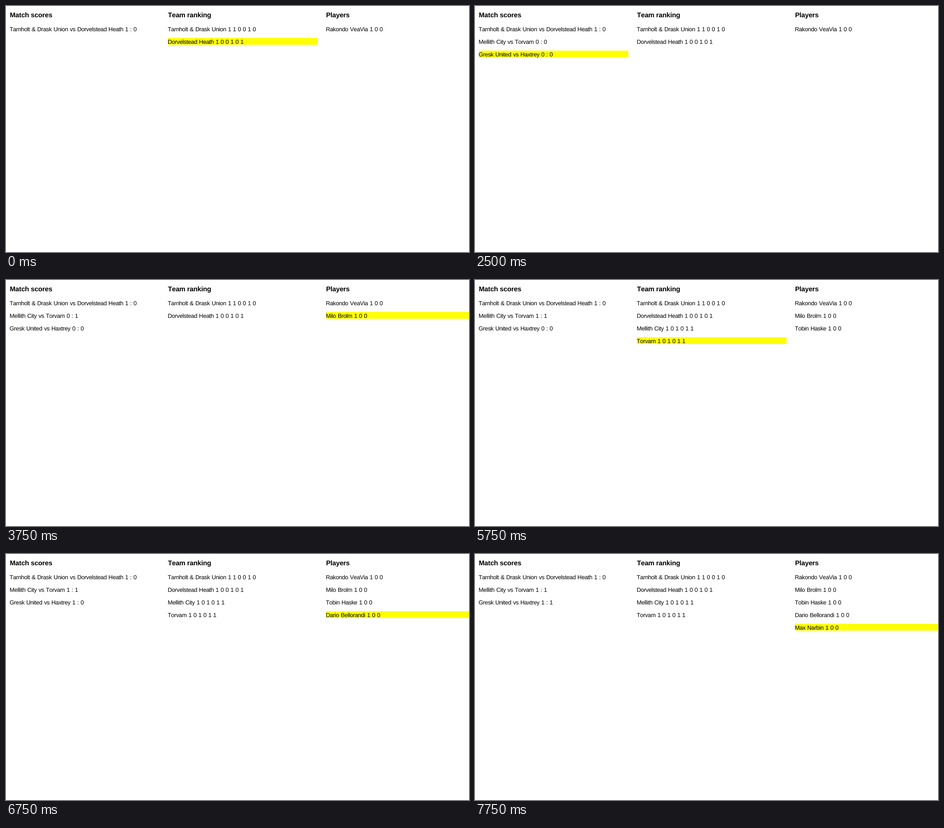
Animation of 1027 by 546 pixels, one loop 8000 ms. Source, as an HTML page with a canvas:

```html
<!DOCTYPE html>
<html lang="en">
<head>
<meta charset="utf-8">
<title>Live scores</title>
<style>
  html, body { margin: 0; width: 100%; height: 100%; overflow: hidden; background: #fff; }
  canvas { display: block; }
</style>
</head>
<body>
<canvas id="stage" width="1027" height="546"></canvas>
<script>
const LOOP = 8000;
const ROW_TOP = 43, ROW_STEP = 28, ROW_HEIGHT = 15;
const COLUMN_WIDTH = 331.7;
const FAMILY = '"Liberation Sans", Arial, sans-serif';

const HOME = 'Tarnholt & Drask Union', AWAY = 'Dorvelstead Heath';
const CITY = 'Mellith City', GUEST = 'Torvam';

const columns = [
  { title: 'Match scores', x: 8.5 },
  { title: 'Team ranking', x: 359.2 },
  { title: 'Players', x: 709.9 }
];

// Each event sets one row; "mark" moves the highlight there.
const set = (at, column, row, text, mark = true) => ({ at, column, row, text, mark });
const events = [
  set(0, 0, 0, `${HOME} vs ${AWAY} 1 : 0`),
  set(0, 2, 0, 'Rakondo VeaVia 1 0 0'),
  set(0, 1, 0, `${HOME} 1 1 0 0 1 0`),
  set(0, 1, 1, `${AWAY} 1 0 0 1 0 1`),
  set(1500, 0, 1, `${CITY} vs ${GUEST} 0 : 0`),
  set(2500, 0, 2, 'Gresk United vs Haxtrey 0 : 0'),
  set(3750, 0, 1, `${CITY} vs ${GUEST} 0 : 1`, false),
  set(3750, 2, 1, 'Milo Brolm 1 0 0'),
  set(4750, 0, 1, `${CITY} vs ${GUEST} 1 : 1`, false),
  set(4750, 2, 2, 'Tobin Haske 1 0 0'),
  set(5750, 1, 2, `${CITY} 1 0 1 0 1 1`),
  set(5750, 1, 3, `${GUEST} 1 0 1 0 1 1`),
  set(6750, 0, 2, 'Gresk United vs Haxtrey 1 : 0', false),
  set(6750, 2, 3, 'Dario Bellorandi 1 0 0'),
  set(7750, 0, 2, 'Gresk United vs Haxtrey 1 : 1', false),
  set(7750, 2, 4, 'Max Narbin 1 0 0')
];

const ctx = document.getElementById('stage').getContext('2d');
ctx.textRendering = 'geometricPrecision';

function useFont(font, letterSpacing, wordSpacing) {
  ctx.font = `${font} ${FAMILY}`;
  ctx.fontKerning = 'none';
  ctx.letterSpacing = letterSpacing;
  ctx.wordSpacing = wordSpacing;
}

function highlight({ column, row }) {
  const { x } = columns[column];
  const left = Math.round(x);
  ctx.fillStyle = '#ff0';
  ctx.fillRect(left, ROW_TOP + row * ROW_STEP, Math.round(x + COLUMN_WIDTH) - left, ROW_HEIGHT);
}

function draw(time) {
  const past = events.filter(event => event.at <= time);
  const rows = new Map(past.map(event => [`${event.column}:${event.row}`, event]));

  ctx.fillStyle = '#fff';
  ctx.fillRect(0, 0, 1027, 546);
  highlight(past.filter(event => event.mark).pop());

  ctx.fillStyle = '#000';
  useFont('bold 15px', '-0.15px', '0px');
  for (const { title, x } of columns) ctx.fillText(title, x, 25);

  useFont('13px', '-0.38px', '0.9px');
  for (const { column, row, text } of rows.values()) {
    ctx.fillText(text, columns[column].x - 0.4, ROW_TOP + 13 + row * ROW_STEP);
  }
}

function tick() {
  draw(performance.now() % LOOP);
  requestAnimationFrame(tick);
}
tick();
</script>
</body>
</html>
```
